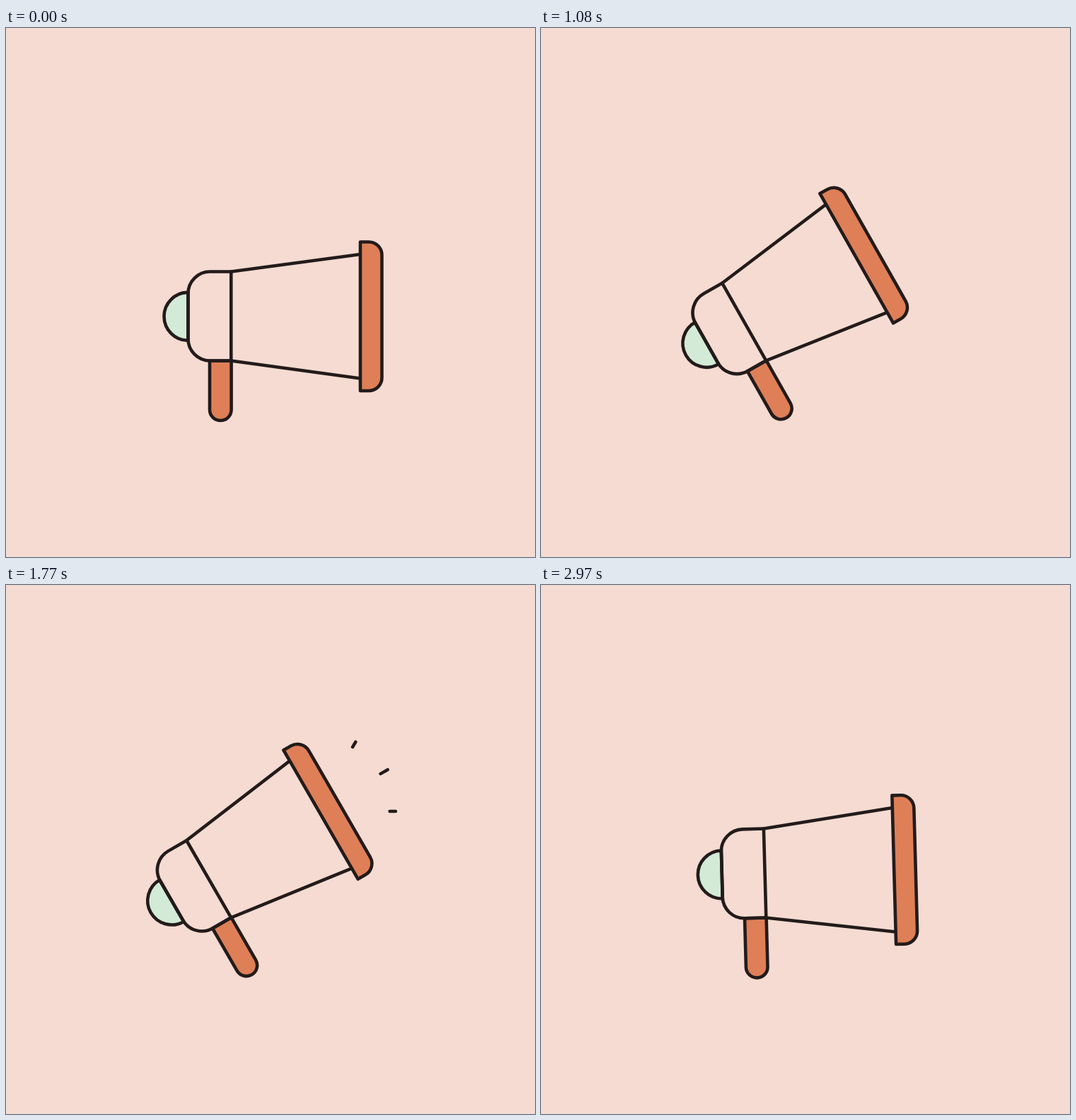
Recreate the animation shown at these times as an HTML page. Size 748 px wide and 748 px high, loop 3 s.

```html
<!DOCTYPE html>
<html lang="en">
<head>
<meta charset="utf-8">
<title>Megaphone</title>
<style>
  html, body { margin: 0; width: 100%; height: 100%; overflow: hidden; background: #f5dbd1; }
  svg { display: block; width: 100vw; height: 100vh; }
  .ink { fill: none; stroke: #231b1b; stroke-width: 4.6; stroke-linecap: round; stroke-linejoin: round; }
  .orange { fill: #df7f57; }
  .green { fill: #d3ead6; }
</style>
</head>
<body>
<svg viewBox="0 0 748 748">
  <g id="horn" class="ink">
    <path class="green" d="M257.5 373.8A34 34 0 0 0 257.5 441.8Z"/>
    <path class="orange" d="M288 470.5V539.7A15.3 15.3 0 0 0 318.6 539.7V470.5Z"/>
    <path d="M318.3 344.5H288.5A31 31 0 0 0 257.5 375.5V439.5A31 31 0 0 0 288.5 470.5H318.3Z"/>
    <path d="M318.3 344.5L501 320M318.3 470.5L501 495.5"/>
    <path class="orange" d="M501 302.5H513A18.5 18.5 0 0 1 531.5 321V494.5A18.5 18.5 0 0 1 513 513H501Z"/>
    <path id="rays"/>
  </g>
</svg>
<script>
const LOOP = 3000, STEP = 30;
const RAISED = 30;                          // resting tilt in degrees
const PEAK = 465, SETTLED = 1380, LOWER = 2700;
const SWING = 7.3, SWING_TIME = 480;        // rebound after the horn is raised
const SHOUT_GAP = 530, SHOUT_TIME = 380, LIFT = 5;

const horn = document.getElementById('horn');
const rays = document.getElementById('rays');

const clamp = x => Math.min(1, Math.max(0, x));
const mix = (a, b, p) => a + (b - a) * p;
const wave = p => (1 - Math.cos(2 * Math.PI * p)) / 2;
const soft = p => mix(p * p * (3 - 2 * p), p, 1 / 3);

// Two shouts follow each other; the age counts from the start of the current one.
function shoutAge(t) {
  const since = t - SETTLED;
  return since < SHOUT_GAP ? since : since - SHOUT_GAP;
}

function tiltAt(t) {
  if (t < PEAK) return (RAISED + SWING) * wave(t / PEAK / 2);
  if (t < SETTLED) {
    const fade = (SETTLED - t) / (SETTLED - PEAK);
    return RAISED + SWING * fade * Math.cos(2 * Math.PI * (t - PEAK) / SWING_TIME);
  }
  if (t < LOWER) return RAISED + LIFT * wave(clamp(shoutAge(t) / SHOUT_TIME));
  return RAISED * (1 - soft((t - LOWER) / (LOOP - LOWER)));
}

// Rays grow outwards, then leave at the far end; k runs from top to bottom.
function raysAt(t) {
  const age = shoutAge(t);
  const from = clamp((age - 250) / 190), to = clamp((age - 20) / 160);
  if (to <= from) return '';
  return [-1, 0, 1].map(k => {
    const side = Math.abs(k);
    const at = p => `${mix(571 - 3.5 * side, 614.6 - 19.6 * side, p)} ${400 + k * mix(41, 56.6, p)}`;
    return `M${at(from)}L${at(to)}`;
  }).join('');
}

function draw(now) {
  const t = Math.floor(now % LOOP / STEP) * STEP;
  horn.setAttribute('transform', `rotate(${-tiltAt(t)} 318 470.5)`);
  rays.setAttribute('d', raysAt(t));
}

const begin = performance.now();
function tick() {
  draw(performance.now() - begin);
  requestAnimationFrame(tick);
}
tick();
</script>
</body>
</html>
```
